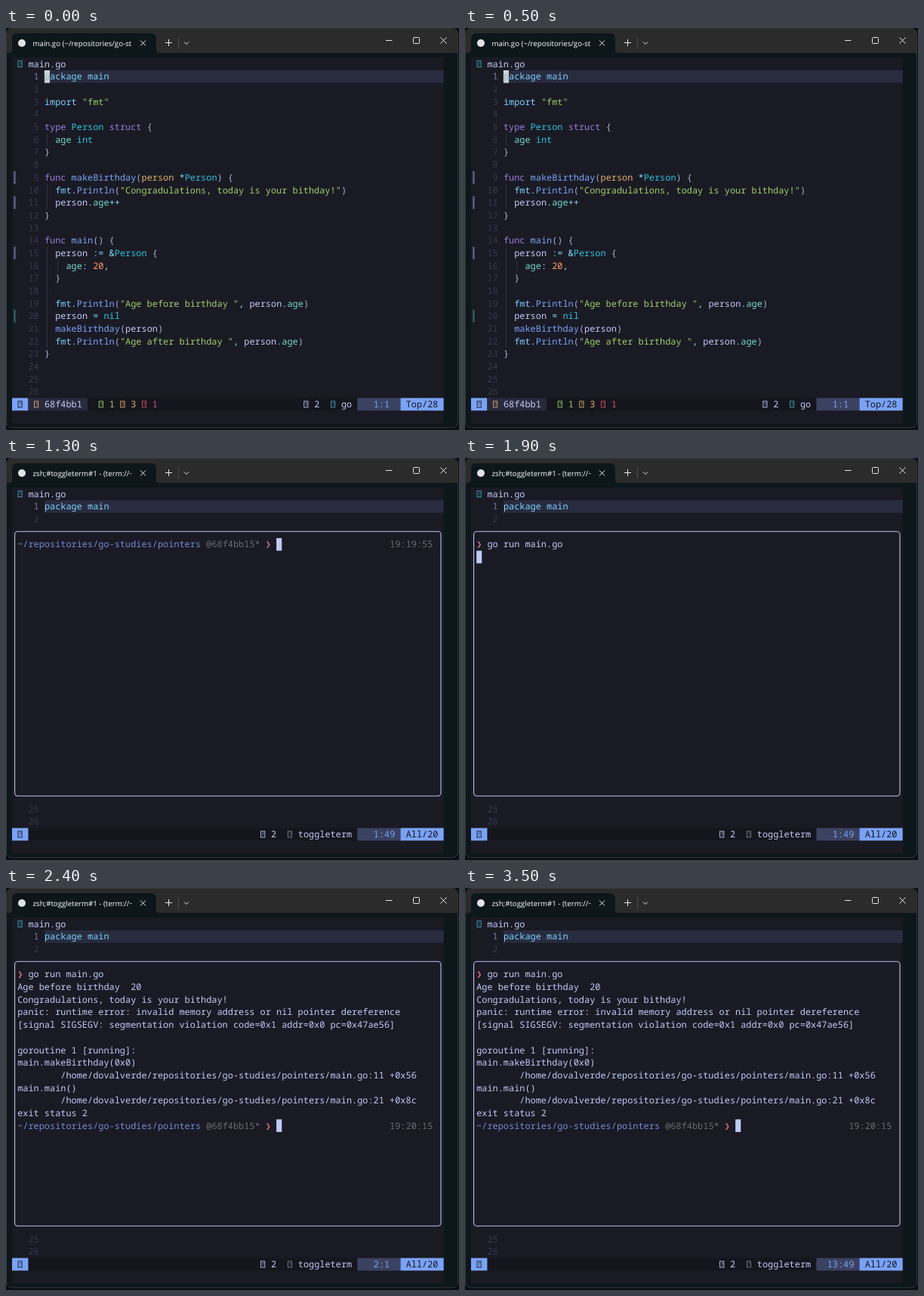
An HTML page for the animation above (3.6 s loop, 600 by 532 pixels).

```html
<!DOCTYPE html>
<html lang="en">
<head>
<meta charset="utf-8">
<title>Terminal session</title>
<style>
  html, body { margin: 0; width: 100%; height: 100%; overflow: hidden; background: #0a0d10; }
  svg { display: block; width: 600px; height: 532px; }
  text { white-space: pre; text-rendering: geometricPrecision; }
  .mono { font: 11.91px "Noto Sans Mono", monospace; }
  .title { font: 500 9.7px "Open Sans", sans-serif; fill: #fff; }
</style>
</head>
<body>
<svg id="stage" viewBox="0 0 600 532" xmlns="http://www.w3.org/2000/svg">
  <defs><clipPath id="tabClip"><rect x="30" y="8" width="136.5" height="24"/></clipPath></defs>
  <rect x=".5" y=".5" width="598" height="528.5" rx="7" fill="#0d171b" stroke="#33383b"/>
  <path d="M1 33V8a7 7 0 0 1 7-7H591a7 7 0 0 1 7 7V33Z" fill="#2b2b2b"/>
  <path d="M4 33a4 4 0 0 0 4-4V13a6 6 0 0 1 6-6H193a6 6 0 0 1 6 6V29a4 4 0 0 0 4 4Z" fill="#0d171b"/>
  <circle cx="21" cy="20" r="5" fill="#e2e2e2"/>
  <text id="title" class="title" x="35.5" y="23.6" clip-path="url(#tabClip)"></text>
  <g fill="none" stroke="#e8e8e8">
    <path d="M178 16.5l7 7m0-7l-7 7M211 19.5h9M215.5 15v9M236 18.5l3 3 3-3"/>
    <path d="M503 16.5h8.500M575.500 12.500l8 8m0-8l-8 8"/>
    <rect x="539.500" y="12.500" width="8" height="8" rx="1"/>
    <path d="M228.500 12v15" stroke="#4c4c4c"/>
  </g>
  <rect x="8" y="39" width="571.700" height="484" fill="#1a1a24"/>
  <g id="screen" class="mono"></g>
</svg>
<script>
const LOOP = 3600;
const CELL = 7.146, LINE = 16.68, LEFT = 8, TOP = 39.3;
const FG = '#c0caf5', BLUE = '#7aa2f7', DARK = '#16161e', TEAL = '#42a5b8', GREY = '#6c6c6c';

const palette = {
  n: FG, b: '#a9b1d6', k: '#9d7cd8', i: '#7dcfff', s: '#9ece6a', t: '#2ac3de',
  f: BLUE, a: '#e0af68', m: '#73daca', o: '#89ddff', d: '#ff9e64'
};

// Each line alternates a palette key and the text in that colour.
const code = [
  'i|package main',
  '',
  'i|import |s|"fmt"',
  '',
  'k|type |t|Person |k|struct |b|{',
  'm|  age |t|int',
  'b|}',
  '',
  'k|func |f|makeBirthday|b|(|a|person |o|*|t|Person|b|) {',
  'i|  fmt|o|.|f|Println|b|(|s|"Congradulations, today is your bithday!"|b|)',
  'n|  person|o|.|m|age|o|++',
  'b|}',
  '',
  'k|func |f|main|b|() {',
  'n|  person |o|:= &|t|Person |b|{',
  'm|    age|o|: |d|20|o|,',
  'b|  }',
  '',
  'i|  fmt|o|.|f|Println|b|(|s|"Age before birthday "|o|, |n|person|o|.|m|age|b|)',
  'n|  person |o|= |t|nil',
  'f|  makeBirthday|b|(|n|person|b|)',
  'i|  fmt|o|.|f|Println|b|(|s|"Age after birthday "|o|, |n|person|o|.|m|age|b|)',
  'b|}'
];

const COMMAND = 'go run main.go';
const PATH = '/home/dovalverde/repositories/go-studies/pointers/main.go:';
const output = [
  'Age before birthday  20',
  'Congradulations, today is your bithday!',
  'panic: runtime error: invalid memory address or nil pointer dereference',
  '[signal SIGSEGV: segmentation violation code=0x1 addr=0x0 pc=0x47ae56]',
  '',
  'goroutine 1 [running]:',
  'main.makeBirthday(0x0)',
  '        ' + PATH + '11 +0x56',
  'main.main()',
  '        ' + PATH + '21 +0x8c',
  'exit status 2'
];

const colX = col => LEFT + col * CELL;
const rowY = row => TOP + row * LINE;
const escape = s => s.replace(/&/g, '&amp;').replace(/</g, '&lt;');

const text = (col, row, str, fill = FG, extra = '') =>
  `<text x="${colX(col)}" y="${rowY(row) + 12.4}" fill="${fill}" ${extra}>${escape(str)}</text>`;
const block = (col, row, cols, fill) =>
  `<rect x="${colX(col)}" y="${rowY(row)}" width="${cols * CELL}" height="${LINE}" fill="${fill}"/>`;
const arrow = (col, row, fill) =>
  text(col, row, '❯', fill, 'style="font-family:\'DejaVu Sans Mono\',monospace"');

// Box shown for a glyph that the font lacks.
function tofu(col, row, color) {
  const x = colX(col) + .9, y = rowY(row) + 4.3;
  return `<rect x="${x}" y="${y}" width="5.2" height="8" fill="none" stroke="${color}" stroke-width=".9"/>
    <text x="${x + 1}" y="${y + 6.3}" fill="${color}" style="font-size:6px">?</text>`;
}

function codeLine(line, row) {
  if (!line) return '';
  const parts = line.split('|');
  let col = 6, out = '';
  for (let i = 0; i < parts.length; i += 2) {
    out += text(col, row, parts[i + 1], palette[parts[i]]);
    col += parts[i + 1].length;
  }
  return out;
}

const lineNumber = n => text(5 - String(n).length, n, String(n), n === 1 ? '#737aa2' : '#343950');

function guide(col, from, to) {
  return `<path d="M${colX(col + .5)} ${rowY(from)}V${rowY(to + 1)}" stroke="#30354a"/>`;
}

function header() {
  return tofu(1, 0, TEAL) + text(3, 0, 'main.go') + block(6, 1, 74, '#272c3f') + codeLine(code[0], 1);
}

function statusBase(position, extent) {
  return block(0, 27, 80, '#15151d') + block(0, 27, 3, BLUE) + tofu(1, 27, DARK) +
    block(64, 27, 8, '#3b4261') + block(72, 27, 8, BLUE) +
    text(71 - position.length - (position.length < 4 ? 1 : 0), 27, position, BLUE) +
    text(73, 27, extent, DARK);
}

function editor() {
  let out = header() + block(6, 1, 1, '#c9d3d8') + text(6, 1, 'p', '#a5b4bd');
  for (let n = 1; n <= 26; n++) out += lineNumber(n);
  out += guide(6, 6, 6) + guide(6, 10, 11) + guide(6, 15, 22) + guide(8, 16, 16);
  code.forEach((line, i) => { if (i) out += codeLine(line, i + 1); });
  for (const row of [9, 11, 15, 20])
    out += `<rect x="10.300" y="${rowY(row)}" width="2.300" height="${LINE}" fill="${row === 20 ? '#2f6664' : '#62658a'}"/>`;

  out += statusBase('1:1', 'Top/28') + block(3, 27, 11, '#282a3d') +
    tofu(4, 27, '#d8a968') + text(6, 27, '68f4bb1');
  [['1', '#9ece6a'], ['3', '#e0af68'], ['1', '#db4b6b']].forEach(([count, color], i) => {
    out += tofu(16 + 4 * i, 27, color) + text(18 + 4 * i, 27, count, color);
  });
  return out + tofu(54, 27, FG) + text(56, 27, '2') + tofu(59, 27, TEAL) + text(61, 27, 'go');
}

function prompt(row, clock, color) {
  return text(1, row, '~/repositories/go-studies/pointers', '#748bd3') +
    text(36, row, '@68f4bb15*', GREY) + arrow(47, row, color) + text(70, row, clock, GREY);
}

function terminal({ typed, entered, printed, returned, position, iconColor }) {
  const RED = '#e56b80', MAGENTA = '#b878aa';
  let out = header();
  for (const n of [1, 2, 25, 26]) out += lineNumber(n);
  out += `<rect x="11.600" y="97.300" width="564.400" height="350" rx="4" fill="#1a1a24" stroke="#b7c0e8" stroke-width="1.100"/>`;

  if (entered) out += arrow(1, 4, printed ? RED : MAGENTA) + text(3, 4, COMMAND);
  else out += prompt(4, '19:19:55', MAGENTA) + (typed ? text(49, 4, COMMAND) : '');
  if (printed) output.forEach((line, i) => { if (line) out += text(1, 5 + i, line); });
  if (returned) out += prompt(16, '19:20:15', RED);

  const cursorCol = returned ? 49 : entered ? 1 : typed ? 49 + COMMAND.length : 49;
  const cursorRow = printed ? 16 : entered ? 5 : 4;
  return out + block(cursorCol, cursorRow, 1, FG) + statusBase(position, 'All/20') +
    tofu(46, 27, FG) + text(48, 27, '2') + tofu(51, 27, iconColor) + text(53, 27, 'toggleterm');
}

const screen = document.getElementById('screen');
const title = document.getElementById('title');
const changes = [0, 600, 1000, 1500, 1900, 2000, 2100, 2200, 3000];
let shown = -1;

function draw(t) {
  const step = changes.filter(at => at <= t).pop();
  if (step === shown) return;
  shown = step;
  const inTerminal = t >= 600;
  title.textContent = inTerminal ? 'zsh;#toggleterm#1 - (term://~/repos' : 'main.go (~/repositories/go-studies';
  // The status line refreshes once a second, so it lags behind the cursor.
  screen.innerHTML = !inTerminal ? editor() : terminal({
    typed: t >= 1500,
    entered: t >= 1900,
    printed: t >= 2100,
    returned: t >= 2200,
    position: t >= 3000 ? '13:49' : t >= 2000 ? '2:1' : '1:49',
    iconColor: t < 1000 ? '#5c9298' : '#7d8087'
  });
}

const start = performance.now();
function tick() {
  draw((performance.now() - start) % LOOP);
  requestAnimationFrame(tick);
}
tick();
</script>
</body>
</html>
```
